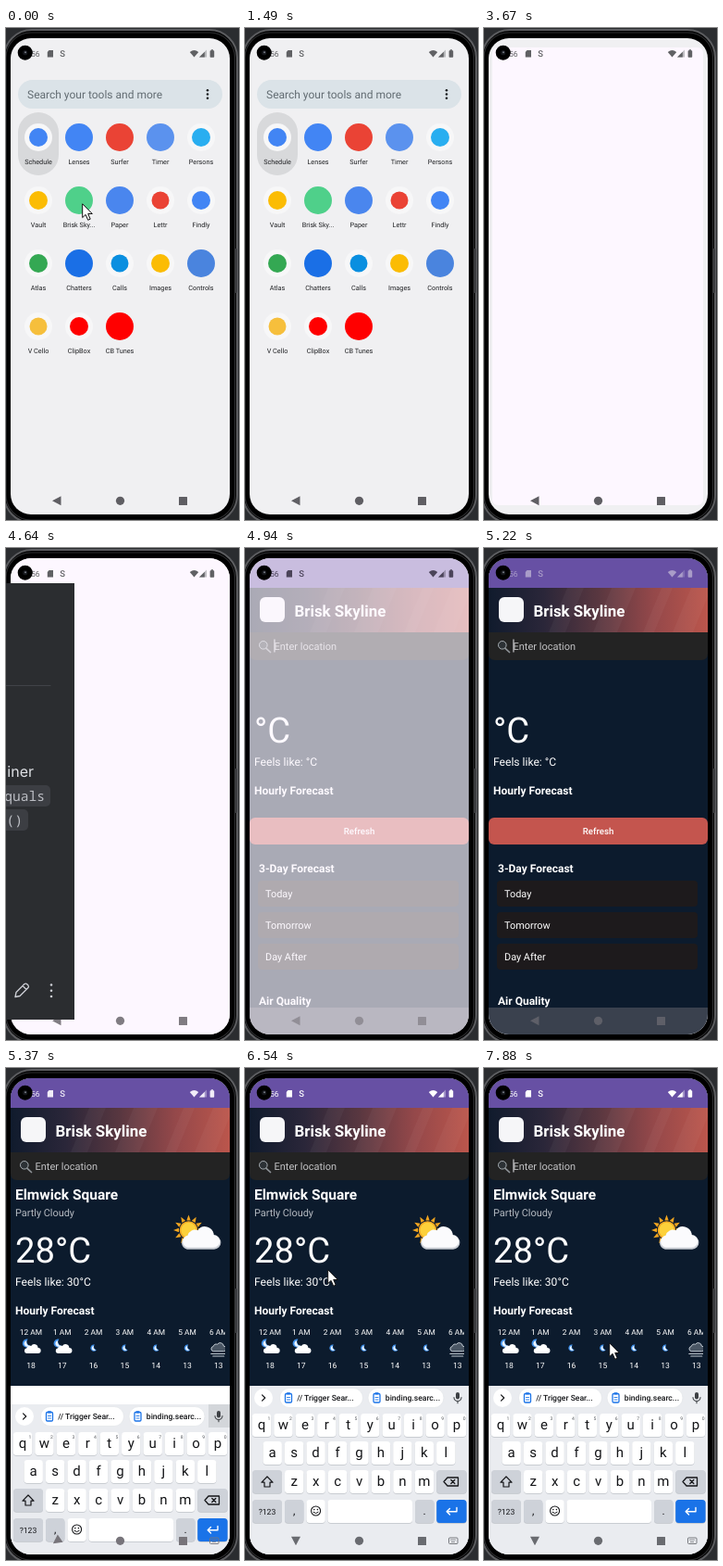
An HTML page for the animation above (8 s loop, 252 by 531 pixels).

```html
<!DOCTYPE html>
<html lang="en">
<head>
<meta charset="utf-8">
<title>Weather app launch</title>
<style>
html, body { margin: 0; width: 100%; height: 100%; overflow: hidden; background: #000; }
svg { display: block; width: 252px; height: 531px; font-family: Roboto, sans-serif; text-rendering: geometricPrecision; }
.mono { font-family: "Noto Sans Mono", monospace; }
.ui { font-family: Inter, sans-serif; }
</style>
</head>
<body>
<svg id="stage" viewBox="0 0 252 531"></svg>
<script>
const LOOP = 8000;

// Markup helpers
const rect = (x, y, w, h, r, fill, more = '') =>
  `<rect x="${x}" y="${y}" width="${w}" height="${h}" rx="${r}" fill="${fill}" ${more}/>`;
const dot = (x, y, r, fill, more = '') => `<circle cx="${x}" cy="${y}" r="${r}" fill="${fill}" ${more}/>`;
const path = (d, fill, more = '') => `<path d="${d}" fill="${fill}" ${more}/>`;
const line = (d, color, width = 1, more = '') =>
  path(d, 'none', `stroke="${color}" stroke-width="${width}" stroke-linecap="round" stroke-linejoin="round" ${more}`);
const text = (x, y, size, fill, str, more = '') =>
  `<text x="${x}" y="${y}" font-size="${size}" fill="${fill}" ${more}>${str}</text>`;
const group = (id, body, more = '') => `<g id="${id}" ${more}>${body}</g>`;
const MID = 'text-anchor="middle"', END = 'text-anchor="end"', BOLD = 'font-weight="700"', MEDIUM = 'font-weight="500"';

function defs() {
  const stops = [[0, '#101b2d'], [.25, '#2a2639'], [.5, '#593740'], [.75, '#94484a'], [1, '#bb564c']];
  const stop = ([o, c]) => `<stop offset="${o}" stop-color="${c}"/>`;
  return `<defs>
    <clipPath id="screen"><rect x="5" y="11" width="237" height="514" rx="22"/></clipPath>
    <clipPath id="hours"><rect x="10" y="275" width="227" height="60"/></clipPath>
    <linearGradient id="head">${stops.map(stop).join('')}</linearGradient>
  </defs>`;
}

function bezel() {
  return rect(0, 0, 252, 531, 0, '#2b2d30')
    + rect(-2, 2, 252, 532, 30, '#000', 'stroke="#5c5d60" stroke-width="2"')
    + rect(0, 5, 247.5, 526, 27, '#000', 'stroke="#2c2d2f" stroke-width="1.2"')
    + rect(247.4, 238, 2.6, 48, 1, '#3b3c3f');
}

function statusBar() {
  const icons = text(20, 31, 8.6, 'currentColor', '5:56')
    + path('M46.5 24H51V31.5H44.8V26Z', 'currentColor')
    + text(58.2, 31, 9.5, 'currentColor', 'S', MEDIUM)
    + path('M198.8 26Q203.5 21.9 208.2 26L203.5 31.6Z', 'currentColor')
    + path('M209 31.5H217V23.5Z', 'currentColor', 'opacity=".4"')
    + path('M209 31.5H214.8V25.7Z', 'currentColor')
    + rect(220.6, 24.3, 4.6, 7.4, .8, 'currentColor') + rect(221.8, 23.3, 2.2, 1.5, 0, 'currentColor');
  return group('status', icons)
    + dot(20.7, 26.7, 8, '#000') + dot(20.7, 26.7, 2.6, '#15171c') + dot(21, 26.3, 1, '#777b85');
}

// label, colour, radius
const APPS = [
  ['Schedule', '#4285f4', 10], ['Lenses', '#4285f4', 15], ['Surfer', '#ea4335', 15], ['Timer', '#5b92ee', 15], ['Persons', '#29aef0', 10],
  ['Vault', '#fbbc04', 10], ['Brisk Sky...', '#4fd08a', 15], ['Paper', '#4a86ee', 15], ['Lettr', '#ea4335', 9.5], ['Findly', '#4285f4', 10],
  ['Atlas', '#34a853', 10], ['Chatters', '#1a6fe6', 15], ['Calls', '#0a8fe0', 9.5], ['Images', '#fbbc04', 10], ['Controls', '#4a84de', 15],
  ['V Cello', '#f6bf3c', 9.5], ['ClipBox', '#f00', 10], ['CB Tunes', '#f00', 15]
];

function home() {
  const cells = APPS.map(([label, color, r], i) => {
    const x = 35 + i % 5 * 44, y = 118 + Math.floor(i / 5) * 68;
    const plate = r < 15 ? dot(x, y, 15, '#f7f7f8') : '';
    return plate + dot(x, y, r, color) + text(x, y + 28.7, 7.25, '#1f2023', label, MID);
  });
  return rect(13, 56, 221, 31, 15.5, '#dbe3e8')
    + text(23, 76, 12, '#626c72', 'Search your tools and more')
    + [67.2, 71.5, 75.8].map(y => dot(218, y, 1.3, '#1c1f21')).join('')
    + rect(13, 91, 44, 68, 22, '#d8d9db') + cells.join('');
}

const CLOUD = 'M9 6a4.5 4.5 0 0 0 0-9a6 6 0 0 0-11-3a5 5 0 0 0-7 3.5a4.3 4.3 0 0 0 0 8.5z';
const cloud = (x, y, s, fill, more = '') => path(CLOUD, fill, `transform="translate(${x} ${y}) scale(${s})" ${more}`);
const moon = (x, y, s) => `<g transform="translate(${x} ${y}) scale(${s})">`
  + path('M1.5-4A4.2 4.2 0 1 0 3.8 2.6A4 4 0 0 1 1.5-4Z', '#3f8fe8')
  + path('M.4-2.6A3 3 0 1 0 2.8 2.6A4 4 0 0 1 .4-2.6Z', '#e8f3ff') + '</g>';

function sunny() {
  let rays = '';
  for (let a = 0; a < 360; a += 30)
    rays += path('M-2.2-10.5L0-16.5L2.2-10.5Z', '#f2a51f', `transform="translate(197.5 175) rotate(${a})"`);
  return rays + dot(197.5, 175, 9.8, '#f7a823') + dot(197.5, 175, 8.2, '#fdd13a')
    + cloud(210.5, 186, 1.62, '#c9cdd4') + cloud(210.5, 184.6, 1.54, '#fbfbfd');
}

function hourly() {
  const names = ['12 AM', '1 AM', '2 AM', '3 AM', '4 AM', '5 AM', '6 AM'];
  const temps = [18, 17, 16, 15, 14, 13, 13];
  const icon = (x, i) => i < 2 ? moon(x - 5, 297, 1.1) + cloud(x + 1.5, 304, .68, '#fff')
    : i < 6 ? moon(x, 302, .85)
    : cloud(x, 302, .62, '#4a5664', 'stroke="#c3cbd3" stroke-width="1.6"') + line(`M${x - 8} 308.5h16M${x - 6} 311h12`, '#c3cbd3', 1.1);
  return `<g clip-path="url(#hours)">` + names.map((n, i) => {
    const x = 27 + i * 33.8;
    return text(x, 288, 8.4, '#fff', n, MID) + icon(x, i) + text(x, 324, 8.6, '#fff', temps[i], MID);
  }).join('') + '</g>';
}

function appHead() {
  return rect(5, 11, 237, 32, 0, '#6750a4') + rect(5, 43, 237, 49, 0, 'url(#head)')
    + [[70, 18], [118, 26], [172, 12], [204, 22]].map(([x, w]) =>
        path(`M${x} 91L${x + 20} 43H${x + 20 + w}L${x + w} 91Z`, '#fff', 'opacity=".035"')).join('')
    + rect(16, 53, 27, 27, 6, '#f6f6f8')
    + text(53.5, 74, 16.9, '#fff', 'Brisk Skyline', BOLD)
    + path('M5 91H242V114Q242 121 235 121H12Q5 121 5 114Z', '#232323')
    + line('M23 108.3L27.5 112.5', '#8d9297', 1.7) + dot(19.8, 104.8, 4.3, '#2c3135', 'stroke="#a9b0b5" stroke-width="1"')
    + text(31.5, 110, 11, '#c3c3c5', 'Enter location')
    + rect(31.4, 98.5, 1.1, 14, 0, '#d8d8dc', 'id="caret"');
}

function emptyBody() {
  const rows = ['Today', 'Tomorrow', 'Day After'].map((d, i) =>
    rect(14, 359 + i * 34, 217, 28, 4, '#1d1a1c') + text(22, 377 + i * 34, 10.9, '#fff', d));
  return text(10, 209.7, 38.2, '#fff', '°C') + text(10, 235.2, 12.1, '#fff', 'Feels like: °C')
    + rect(5, 291, 237, 29, 6, '#c4554e') + text(123.5, 309.3, 9.7, '#fff', 'Refresh', `${MID} ${MEDIUM}`)
    + text(15, 350, 12, '#fff', '3-Day Forecast', BOLD) + rows.join('')
    + text(15, 493, 12, '#fff', 'Air Quality', BOLD)
    + rect(5, 496, 237, 29, 0, '#8a8688', 'opacity=".36"');
}

function loadedBody() {
  return text(10, 142, 15.5, '#fff', 'Elmwick Square', BOLD)
    + text(10, 160, 10.9, '#b7bcc3', 'Partly Cloudy') + sunny()
    + text(10, 209.7, 38.2, '#fff', '28°C') + text(10, 235.2, 12.1, '#fff', 'Feels like: 30°C')
    + hourly() + rect(5, 343, 237, 182, 0, '#fff');
}

function keyboard() {
  const INK = '#141518', GREY = '#ced2d9', PITCH = 23.45;
  const key = (x, y, w, fill = '#fff') => rect(x, y + .8, w, 25, 3.5, '#bfc3c9') + rect(x, y, w, 25, 3.5, fill);
  const row = (str, x0, y) => [...str].map((c, i) => {
    const x = x0 + i * PITCH;
    return key(x - 10.2, y - 12.5, 20.4) + text(x, y + 4.8, 15, INK, c, MID);
  }).join('');
  const chip = (x, w, label) => rect(x, 345.5, w, 21, 10.5, '#fff', 'stroke="#dfe2e6" stroke-width=".6"')
    + rect(x + 6, 351.5, 7, 9.5, 1.3, 'none', 'stroke="#1a73e8" stroke-width="1.3"')
    + rect(x + 7.6, 350.2, 3.8, 2.4, .6, '#1a73e8') + line(`M${x + 8} 355.5h3M${x + 8} 358h3`, '#1a73e8', .9)
    + text(x + 18.8, 359, 8.6, INK, label, MEDIUM);
  const digits = [...'1234567890'].map((d, i) => text(26 + i * PITCH, 380, 5, '#55585d', d, MID)).join('');

  return rect(5, 343, 237, 200, 0, '#eaecf0')
    + dot(20, 356, 10, '#fff') + line('M18.5 352.8L21.7 356L18.5 359.2', INK, 1.2)
    + chip(37.5, 90, '// Trigger Sear...') + chip(133, 82, 'binding.searc...')
    + rect(219, 343, 23, 25, 0, '#d3d6da', 'id="micPatch"')
    + rect(228, 350, 4, 7.5, 2, '#3d4044') + line('M226 355.5a4 4 0 0 0 8 0M230 359.5v2.2', '#3d4044', 1.1)
    + row('qwertyuiop', 18, 385.5) + digits + row('asdfghjkl', 29.7, 415.5) + row('zxcvbnm', 53.2, 446.5)
    + key(8, 434, 32, GREY) + line('M24 441L30 447.2H27V452H21V447.2H18Z', INK, 1.2)
    + key(207.2, 434, 32.4, GREY) + line('M215 446.5L219 442H230.5V451H219ZM222.8 444.5l4 4m0-4l-4 4', INK, 1.3)
    + key(8, 466, 32, GREY) + text(24, 481.5, 8.6, INK, '?123', MID)
    + key(43, 466, 20.4, GREY) + text(53.2, 482, 12, INK, ',', MID)
    + key(66.4, 466, 20.4) + dot(76.6, 478, 5, 'none', `stroke="${INK}" stroke-width="1.1"`)
    + dot(74.8, 476.6, .8, INK) + dot(78.4, 476.6, .8, INK) + line('M74 479.4q2.6 2.6 5.2 0', INK, 1)
    + key(89.4, 466, 91.6) + key(184, 466, 20.4, GREY) + text(194.2, 482, 12, INK, '.', MID)
    + key(207.2, 466, 32.4, '#1a73e8') + line('M229 474.5V478.8H218.5M221.5 475.5L218.2 478.8L221.5 482', '#fff', 1.4);
}

function navBar() {
  return path('M-5 0L4.5-5V5Z', 'currentColor', 'id="back"')
    + dot(123.5, 510.3, 4.6, 'currentColor') + rect(187, 506, 9, 9, .5, 'currentColor')
    + group('switcher', rect(220.5, 507, 9.5, 6.5, 1, 'none', 'stroke="currentColor" stroke-width=".9"')
      + line('M222.5 509.2h5.5M223.5 511.5h3.5', 'currentColor', .8, 'stroke-dasharray="1 1"'));
}

function panel() {
  const TXT = '#bcbec4';
  return rect(0, 38, 74, 471, 0, '#2b2d30') + line('M0 148.5H48', '#414348')
    + text(30, 247, 16, '#dfe1e5', 'container', END + ' class="ui"')
    + rect(-10, 256, 58, 23, 5, '#3c3e43') + text(42, 272.5, 14.6, TXT, 'equals', END + ' class="mono"')
    + rect(-10, 282, 34, 23, 5, '#3c3e43') + text(18, 298.5, 14.6, TXT, '()', END + ' class="mono"')
    + line('M10 484.5L11 479.5L20 470.5Q21.5 469.5 23 471L24 472Q25 473.5 24 474.5L15 483.5ZM18 472.5L22 476.5', '#ced0d6', 1.3)
    + [471.5, 477.8, 484].map(y => dot(49, y, 1.3, '#ced0d6')).join('');
}

const stage = document.getElementById('stage');
stage.innerHTML = defs() + bezel()
  + `<g clip-path="url(#screen)">`
  + rect(5, 11, 237, 514, 0, '#f0f0f2')
  + group('home', home())
  + rect(0, 0, 0, 0, 6, '#fdf7ff', 'id="splash"')
  + group('app', rect(5, 11, 237, 514, 0, '#0c1b2d') + appHead()
    + text(10, 266, 12, '#fff', 'Hourly Forecast', BOLD)
    + group('empty', emptyBody()) + group('loaded', loadedBody()))
  + group('keys', keyboard()) + group('nav', navBar()) + statusBar() + '</g>'
  + group('panel', panel())
  + group('cursor', path('M.7.8V15.6L4.1 12.4L6.7 18.3L9.2 17.2L6.7 11.5H11.3Z', '#fff', 'stroke="#111" stroke-width="1"'));

// Step tables: [start ms, value...]
const CURSOR = [[0, 82, 189], [160, 77, 189], [1360, 75, 189], [1490], [6390, 77, 441], [6540, 89, 217], [6690, 90, 164],
  [6840, 89, 115], [7310, 87, 111], [7460, 87, 120], [7610, 105, 217], [7760, 120, 258], [7880, 135, 296]];
const CARET = [[0, 1], [5370, 0], [5950, 1], [6390, 0], [6990, 1], [7460, 0], [7880, 1]];
const SPLASH = [[0], [3670, 9, 21, 228, 494], [3820, 7, 15, 233, 505], [3940, 5, 11, 237, 514]];
const APP = [[0, 0], [4940, .35], [5070, .77], [5220, 1]];
const STATUS = [[0, '#606164'], [4940, '#4b4459'], [5220, '#a99cc8'], [5370, '#f1edf8'], [5520, '#fff']];
const NAV = [[0, '#5f5e63'], [4640, '#807c82'], [4940, '#77747a'], [5520, '#696b70']];
const BACK = [[0, 0], [5370, -35], [5520, -90]];
const KEYS = [[0], [5370, 20], [5520, 0]];

const at = (table, t) => table.findLast(step => step[0] <= t).slice(1);
const $ = id => document.getElementById(id);
const show = (id, on) => $(id).setAttribute('display', on ? 'inline' : 'none');
const move = (id, x, y) => $(id).setAttribute('transform', `translate(${x} ${y})`);

function draw(t) {
  const [cx, cy] = at(CURSOR, t);
  show('cursor', cx !== undefined);
  if (cx !== undefined) move('cursor', cx, cy);

  const box = at(SPLASH, t);
  show('home', !box.length);
  show('splash', box.length);
  box.forEach((v, i) => $('splash').setAttribute(['x', 'y', 'width', 'height'][i], v));

  const [alpha] = at(APP, t);
  $('app').setAttribute('opacity', alpha);
  const loaded = t >= 5370;
  show('empty', !loaded);
  show('loaded', loaded);
  show('caret', at(CARET, t)[0]);

  const [drop] = at(KEYS, t);
  show('keys', drop !== undefined);
  show('micPatch', drop > 0);
  if (drop !== undefined) move('keys', 0, drop);

  show('panel', t >= 4370 && t < 4940);
  show('switcher', loaded);
  $('status').style.color = at(STATUS, t)[0];
  $('nav').style.color = at(NAV, t)[0];
  $('nav').setAttribute('opacity', t >= 4940 && t < 5370 ? .6 : 1);
  $('back').setAttribute('transform', `translate(55 510.3) rotate(${at(BACK, t)[0]})`);
}

const start = performance.now();
function tick() {
  draw((performance.now() - start) % LOOP);
  requestAnimationFrame(tick);
}
tick();
</script>
</body>
</html>
```
